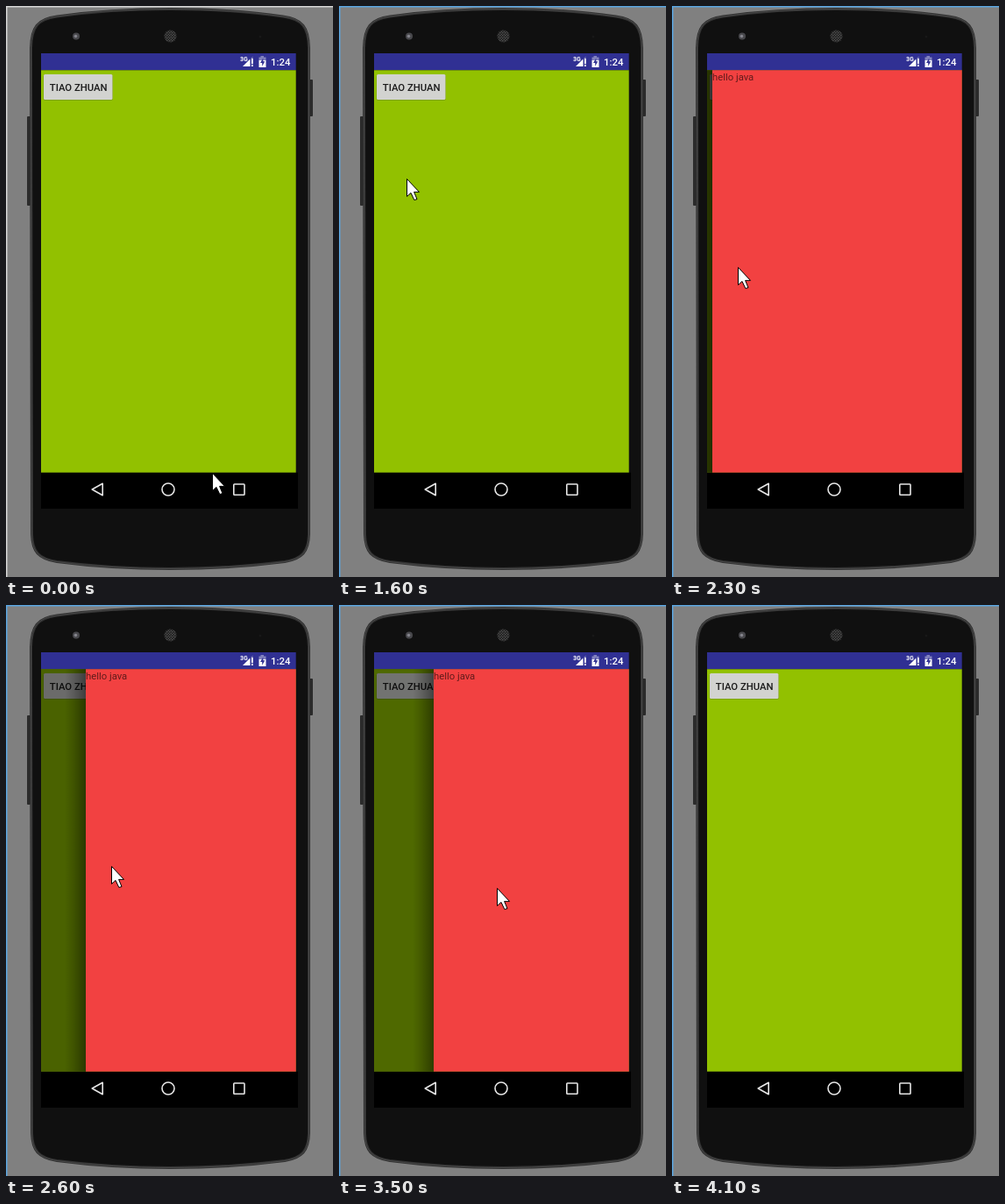
Write an HTML page that moves like this. It is 373 px wide and 652 px high and loops after 4400 ms.

```html
<!DOCTYPE html>
<html lang="en">
<head>
<meta charset="utf-8">
<title>Swipe back demo</title>
<style>
  html, body { margin: 0; width: 100%; height: 100%; overflow: hidden; background: #808080; }
  svg { display: block; width: 373px; height: 652px; }
  text { font-family: Roboto, "Noto Sans", sans-serif; }
</style>
</head>
<body>
<svg viewBox="0 0 373 652" xmlns="http://www.w3.org/2000/svg">
  <defs>
    <linearGradient id="edge">
      <stop offset="0" stop-opacity="0"/>
      <stop offset="0.4" stop-opacity="0.14"/>
      <stop offset="1" stop-opacity="0.42"/>
    </linearGradient>
    <pattern id="mesh" width="3" height="3" patternUnits="userSpaceOnUse">
      <rect width="3" height="3" fill="#1c1c1c"/>
      <circle cx="0.8" cy="0.8" r="0.8" fill="#5c5c5c"/>
      <circle cx="2.3" cy="2.3" r="0.8" fill="#4c4c4c"/>
    </pattern>
    <clipPath id="content"><rect x="40" y="73" width="290.7" height="463"/></clipPath>
    <path id="shell" d="M28.5 48C29 24 36 15 58 12C100 6 145 3.5 187 3.5S275 6 316 12C338 15 345 24 345.5 48V603C345 623 338 631 318 634.5C275 640 230 642.5 187 642.5S100 640 58 634.5C37 631 30 623 29.5 603Z"/>
  </defs>

  <rect width="373" height="652" fill="#808080"/>
  <path id="border" d="M0 0.75H373M0.75 0V652" fill="none" stroke-width="1.5"/>

  <!-- Phone body -->
  <g fill="#2b2b2b">
    <rect x="24" y="126" width="4" height="102" rx="1"/>
    <rect x="346" y="84" width="4" height="42" rx="1"/>
  </g>
  <use href="#shell" fill="#101010" stroke="#303030" stroke-width="3"/>
  <use href="#shell" fill="none" stroke="#484848"/>
  <circle cx="80" cy="34.5" r="4" fill="#48484c"/>
  <circle cx="79.5" cy="34.5" r="1.8" fill="#84848c"/>
  <circle cx="187.5" cy="34.5" r="7" fill="url(#mesh)"/>
  <circle cx="290" cy="35" r="1.5" fill="#181818"/>

  <!-- Status bar -->
  <rect x="40" y="54" width="290.7" height="19.3" fill="#303093"/>
  <g fill="#fff">
    <text x="267" y="63" font-size="7" font-weight="700">3G</text>
    <path d="M270 69L278.5 60.5V69Z"/>
    <path d="M278.5 60.5L281.5 57.5V60H278.5Z" opacity="0.35"/>
    <path d="M280 60H281.800V66.300H280ZM280 67.300H281.800V69H280Z"/>
    <path d="M290.5 57H294V58.5H296.5V62H288.5V58.5H290.5Z" opacity="0.4"/>
    <path d="M288.5 62H296.5V70H288.5Z"/>
    <path d="M293.3 59.5L290 65H292.2V68.8L295.3 63.3H293.3Z" fill="#303093"/>
    <text x="302" y="68" font-size="11.4" font-weight="500">1:24</text>
  </g>

  <!-- Navigation bar -->
  <rect x="40" y="532.7" width="293" height="41.3"/>
  <g fill="none" stroke="#e6e6e6" stroke-width="1.6" stroke-linejoin="round">
    <path d="M110.2 545.3V558.7L98.2 552Z"/>
    <circle cx="185" cy="552" r="7"/>
    <rect x="259.800" y="546" width="12.200" height="12.200" rx="0.8"/>
  </g>

  <!-- Pages -->
  <g clip-path="url(#content)">
    <rect x="40" y="73.3" width="291" height="459.4" fill="#92c100"/>
    <rect x="42.5" y="78.5" width="79.5" height="29.2" rx="2" opacity="0.2"/>
    <rect x="43" y="78" width="78.5" height="29" rx="1.5" fill="#d2d3d0"/>
    <text x="49.800" y="97" font-size="11.3" font-weight="500" fill="#1c1c1c">TIAO ZHUAN</text>
    <rect id="scrim" x="40" y="73.3" width="291" height="459.4"/>
    <g id="page">
      <rect x="16" y="73.3" width="24" height="459.4" fill="url(#edge)"/>
      <rect x="40" y="54" width="291" height="19.3" fill="#303093"/>
      <rect x="40" y="73.3" width="291" height="459.4" fill="#f24141"/>
      <text x="40" y="85" font-size="11.3" fill-opacity="0.6">hello java</text>
    </g>
  </g>

  <path id="cursor" d="M0.5 0.5V20.5L5 16.4L8.8 24.5L12 23.6L8.6 15.4H14.5Z" fill="#fff" stroke="#000"/>
</svg>
<script>
  const LOOP = 4400, STEP = 100, WIDTH = 291;
  const el = id => document.getElementById(id);
  const border = el('border'), scrim = el('scrim'), page = el('page'), cursor = el('cursor');

  // Progress from 0 to 1 between two times
  const ramp = (t, from, to) => Math.min(1, Math.max(0, (t - from) / (to - from)));

  // A short pull that springs back, then a full swipe that closes the page
  const pull = t => 54 * Math.sin(Math.PI * ramp(t, 2200, 2900)) ** 2.6;
  const swipe = t => WIDTH * ramp(t, 3300, 3900) ** 1.32;

  function pointer(t) {
    if (t < 200) {
      const p = ramp(t, 0, 100);
      return [235 - 146 * p, 533 - 113 * p];
    }
    if (t < 1000) {
      const p = ramp(t, 400, 1000);
      return [84 * p, 345 - 250 * p - 165 * Math.sin(Math.PI * p)];
    }
    const toPage = ramp(t, 1500, 1700), rest = ramp(t, 2700, 3000);
    const toGrip = ramp(t, 3000, 3300), leave = ramp(t, 3900, 4000);
    const held = Math.min(swipe(t), 208);
    return [
      84 - 15 * toPage - 2 * rest + 45 * toGrip + pull(t) + held - 93 * leave,
      95 + 203 * toPage + 8 * rest + 6 * toGrip + 0.16 * held + 34 * leave
    ];
  }

  const show = (node, on) => node.setAttribute('visibility', on ? 'visible' : 'hidden');
  const move = (node, x, y) =>
    node.setAttribute('transform', `translate(${Math.round(x)} ${Math.round(y)})`);

  function draw(time) {
    const t = Math.floor(time % LOOP / STEP) * STEP;
    border.setAttribute('stroke', t < 1000 ? '#d6d6d6' : '#5ba6e2');

    const open = t >= 1700 && t < 3900;
    const x = pull(t) + swipe(t);
    show(page, open);
    show(scrim, open);
    move(page, x, t < 1800 ? 3 : 0);
    scrim.setAttribute('opacity', 0.6 * (1 - x / WIDTH));

    show(cursor, t < 200 || (t >= 400 && t < 4100));
    move(cursor, ...pointer(t));
  }

  const start = performance.now();
  function tick() {
    draw(performance.now() - start);
    requestAnimationFrame(tick);
  }
  tick();
</script>
</body>
</html>
```
